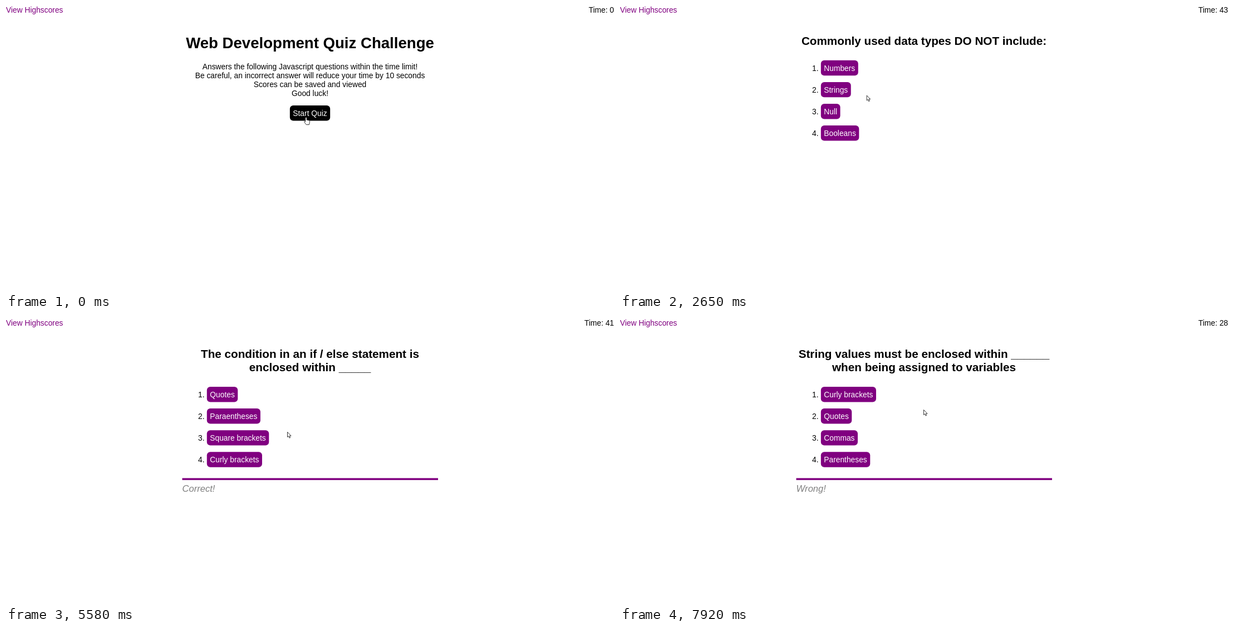
These frames come from a looping animation (1092 px wide and 513 px high, 7.99 s). An HTML page with a canvas:

```html
<!DOCTYPE html>
<html lang="en">
<head>
<meta charset="utf-8">
<title>Quiz</title>
<style>
  html, body { margin: 0; width: 100%; height: 100%; overflow: hidden; background: #fff; }
  canvas { display: block; }
</style>
</head>
<body>
<canvas id="stage" width="1092" height="513"></canvas>
<script>
const ctx = document.getElementById('stage').getContext('2d');
const LOOP = 7990, CENTER = 546, SIZE = 13.8;
const FAMILY = '"Liberation Sans", Arial, sans-serif';
const BUTTON_HEIGHT = 27.4, ROW = 39.1, PADDING = 5.5;

const intro = [
  'Answers the following Javascript questions within the time limit!',
  'Be careful, an incorrect answer will reduce your time by 10 seconds',
  'Scores can be saved and viewed',
  'Good luck!'
];

const questions = [
  { from: 640, title: ['Commonly used data types DO NOT include:'],
    answers: ['Numbers', 'Strings', 'Null', 'Booleans'] },
  { from: 4050, title: ['The condition in an if / else statement is', 'enclosed within _____'],
    answers: ['Quotes', 'Paraentheses', 'Square brackets', 'Curly brackets'],
    feedback: 'Correct!', feedbackEnd: 6070 },
  { from: 6660, title: ['String values must be enclosed within ______', 'when being assigned to variables'],
    answers: ['Curly brackets', 'Quotes', 'Commas', 'Parentheses'],
    feedback: 'Wrong!', feedbackEnd: LOOP }
];

// Pointer moves: first step, last step, number of steps, x, y
const moves = [
  [1420, 1900, 8, 505, 140],
  [1970, 2180, 4, 482, 126],
  [2250, 3030, 13, 409, 190],
  [3110, 3320, 4, 398, 215.5],
  [3390, 3520, 3, 395, 224],
  [4790, 5120, 6, 510, 208],
  [5580, 5580, 1, 505, 203],
  [5650, 5930, 5, 420, 168.5],
  [7180, 7390, 4, 560, 168],
  [7920, 7920, 1, 545, 163]
];

const clicks = [[500, 640], [3710, 4050], [6330, 6660]];

const arrow = new Path2D('M.5 .5V9.6L2.6 7.8L4 11.2L5.6 10.5L4.2 7.3H7Z');
const hand = new Path2D('M-1.2 1.2Q0 -.6 1.2 1.2V5L5.4 6Q6.8 6.4 6.5 8.5L5.4 13.6H.3L-3.3 8.8Q-3.4 6.9 -1.2 8.2Z');

function pointerAt(t) {
  let x = 539, y = 200;
  for (const [start, end, steps, toX, toY] of moves) {
    if (t < start) break;
    const gap = (end - start) / (steps - 1) || 1;
    const progress = Math.min(steps, Math.floor((t - start) / gap + 1.1)) / steps;
    x += (toX - x) * progress;
    y += (toY - y) * progress;
  }
  return { x, y };
}

function text(string, x, y, { size = SIZE, style = '', color = '#000', align = 'left' } = {}) {
  ctx.font = `${style} ${size}px ${FAMILY}`;
  ctx.fillStyle = color;
  ctx.textAlign = align;
  ctx.fillText(string, x, y);
}

// Draws a button and tells whether the pointer is over it
function button(label, x, y, pointer, centered) {
  ctx.font = `${SIZE}px ${FAMILY}`;
  const width = ctx.measureText(label).width + 2 * PADDING;
  if (centered) x -= width / 2;
  const hovered = pointer.x >= x && pointer.x <= x + width &&
                  pointer.y >= y && pointer.y <= y + BUTTON_HEIGHT;
  ctx.fillStyle = hovered ? '#000' : '#800080';
  ctx.beginPath();
  ctx.roundRect(x, y, width, BUTTON_HEIGHT, 6);
  ctx.fill();
  text(label, x + PADDING, Math.round(y + 19), { color: '#fff' });
  return hovered;
}

function drawIntro(pointer) {
  text('Web Development Quiz Challenge', CENTER, 76, { size: 27.6, style: 'bold', align: 'center' });
  intro.forEach((line, i) => text(line, CENTER, 114 + 16 * i, { align: 'center' }));
  return button('Start Quiz', CENTER, 179, pointer, true);
}

function drawQuestion({ title, answers, feedback, feedbackEnd }, pointer, t) {
  title.forEach((line, i) =>
    text(line, CENTER, 70 + 24 * i, { size: 20.7, style: 'bold', align: 'center' }));
  let hovered = false;
  answers.forEach((answer, i) => {
    const y = 73.6 + 24.2 * title.length + ROW * i;
    text(`${i + 1}.`, 345, Math.round(y + 19));
    if (button(answer, 360.8, y, pointer)) hovered = true;
  });
  if (feedback && t < feedbackEnd) {
    ctx.fillStyle = '#800080';
    ctx.fillRect(316.5, 286.4, 459.5, 3.5);
    text(feedback, 316.5, 311, { size: 16.56, style: 'italic', color: '#808080' });
  }
  return hovered;
}

function drawPointer({ x, y }, hovered, t) {
  ctx.save();
  ctx.translate(x, y);
  if (clicks.some(([start, end]) => t >= start && t < end)) {
    ctx.fillStyle = 'rgba(255, 240, 0, .6)';
    ctx.beginPath();
    ctx.arc(.3, .3, 7, 0, 2 * Math.PI);
    ctx.fill();
  }
  const shape = hovered ? hand : arrow;
  ctx.fillStyle = '#fff';
  ctx.strokeStyle = '#222';
  ctx.lineWidth = .9;
  ctx.fill(shape);
  ctx.stroke(shape);
  ctx.restore();
}

function draw(t) {
  ctx.fillStyle = '#fff';
  ctx.fillRect(0, 0, 1092, 513);

  const started = t >= questions[0].from;
  const penalty = t >= questions[2].from ? 10 : 0;
  const time = started ? 45 - Math.floor((t - questions[0].from) / 1002) - penalty : 0;
  text('View Highscores', 0, 12, { color: '#800080' });
  text(`Time: ${time}`, 1092, 12, { align: 'right' });

  const pointer = pointerAt(t);
  const question = questions.filter(q => t >= q.from).pop();
  const hovered = question ? drawQuestion(question, pointer, t) : drawIntro(pointer);
  drawPointer(pointer, hovered, t);
}

function frame() {
  draw(performance.now() % LOOP);
  requestAnimationFrame(frame);
}
frame();
</script>
</body>
</html>
```
